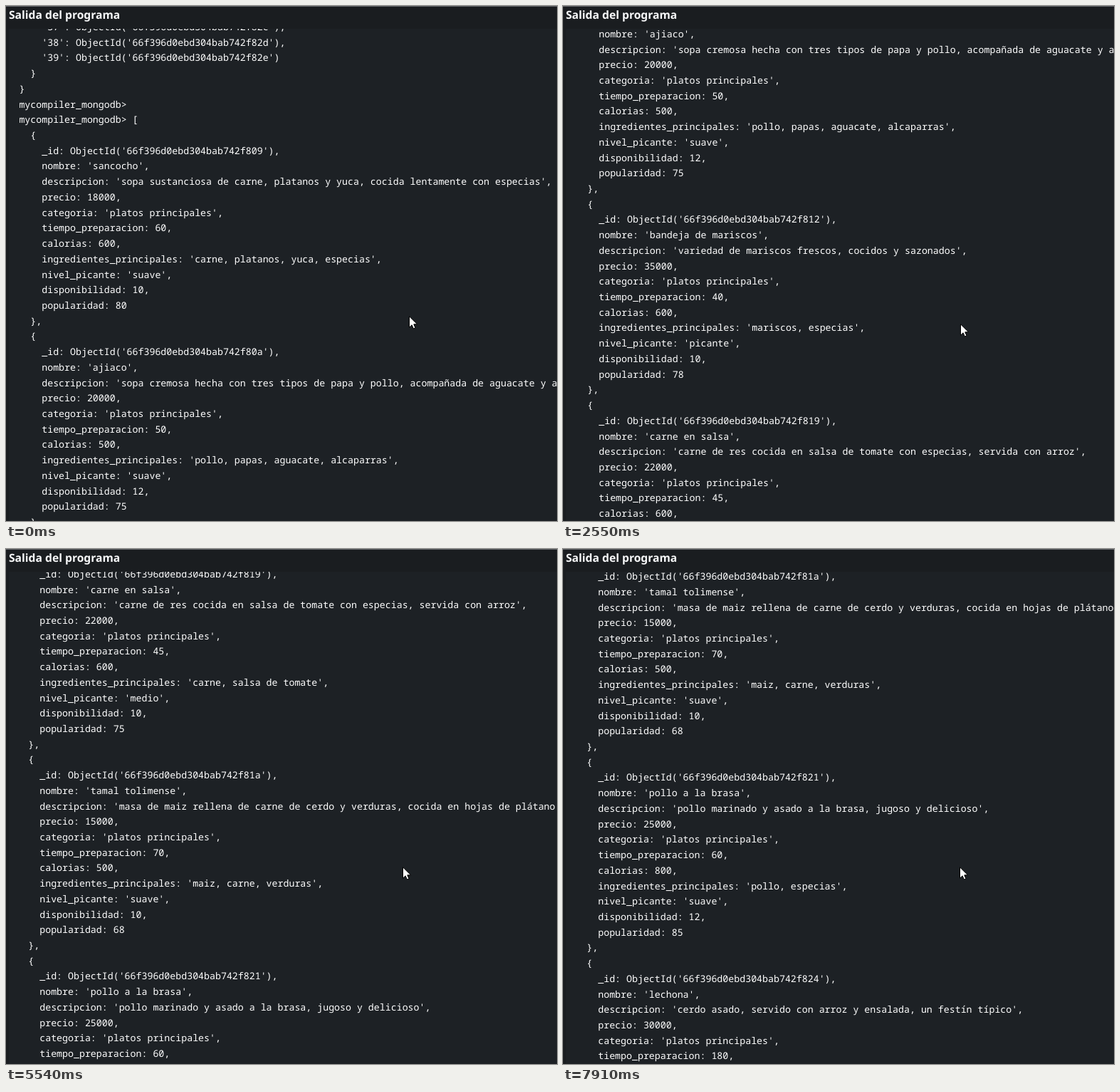
An HTML page for the animation above (8 s loop, 774 px wide and 723 px high).

```html
<!DOCTYPE html>
<html lang="es">
<head>
<meta charset="utf-8">
<title>Salida del programa</title>
<style>
html, body {
  margin: 0;
  width: 100%;
  height: 100%;
  overflow: hidden;
  background: #1a1d20;
}
.stage {
  position: relative;
  width: 774px;
  height: 723px;
  overflow: hidden;
  color: #fff;
}
.rule {
  position: absolute;
  inset: 0 0 auto;
  height: 1px;
  background: #64676a;
}
h1 {
  position: absolute;
  left: 4px;
  top: 1px;
  margin: 0;
  font: bold 15.65px/22px "Noto Sans", "Open Sans", sans-serif;
  text-rendering: geometricPrecision;
  white-space: nowrap;
  color: #f8f9fa;
}
.panel {
  position: absolute;
  left: 4px;
  top: 32px;
  right: 0;
  bottom: 0;
  overflow: hidden;
  background: #1d2125;
}
pre {
  position: absolute;
  left: 14.4px;
  top: -13px;
  margin: 0;
  font: 500 13.27px/21.72px "Noto Sans Mono", "DejaVu Sans Mono", monospace;
  font-variant-ligatures: none;
  text-rendering: geometricPrecision;
  animation: scroll 8s step-end infinite;
}
.cursor {
  position: absolute;
  left: 0;
  top: 0;
  width: 13px;
  height: 20px;
  overflow: visible;
  animation: point 8s step-end infinite;
}
@keyframes scroll {
  0% { transform: translate(0, 0); }
  1.875% { transform: translate(0, -20px); }
  3.5% { transform: translate(0, -58px); }
  5.125% { transform: translate(0, -88px); }
  6.75% { transform: translate(0, -108px); }
  8.375% { transform: translate(0, -117px); }
  15.375% { transform: translate(0, -133px); }
  17.25% { transform: translate(0, -234px); }
  23.75% { transform: translate(0, -236px); }
  25.375% { transform: translate(0, -328px); }
  26.875% { transform: translate(0, -351px); }
  30% { transform: translate(0, -400px); }
  31.875% { transform: translate(0, -468px); }
  35% { transform: translate(0, -490px); }
  36.625% { transform: translate(0, -585px); }
  39.75% { transform: translate(0, -592px); }
  41.625% { transform: translate(0, -702px); }
  45% { transform: translate(0, -730px); }
  46.5% { transform: translate(0, -819px); }
  62.125% { transform: translate(-1px, -832px); }
  63.75% { transform: translate(-1px, -870px); }
  65.375% { transform: translate(-1px, -920px); }
  67.375% { transform: translate(-3px, -972px); }
  69.25% { transform: translate(-3px, -1015px); }
  70.75% { transform: translate(-3px, -1042px); }
  72.375% { transform: translate(-3px, -1066px); }
  74% { transform: translate(-3px, -1086px); }
  75.625% { transform: translate(-3px, -1104px); }
  77.25% { transform: translate(0, -1118px); }
  79.125% { transform: translate(0, -1130px); }
  81% { transform: translate(0, -1140px); }
  83% { transform: translate(0, -1147px); }
  84.875% { transform: translate(-1px, -1153px); }
  93.75% { transform: translate(-1px, -1170px); }
  95.375% { transform: translate(-1px, -1215px); }
  97.25% { transform: translate(-1px, -1262px); }
  98.875%, 100% { transform: translate(-1px, -1294px); }
}
@keyframes point {
  0% { transform: translate(566px, 435px); }
  1.875% { transform: translate(563px, 439px); }
  3.5% { transform: translate(560px, 444px); }
  5.125% { transform: translate(558px, 446px); }
  50%, 100% { transform: translate(557px, 446px); }
}
</style>
</head>
<body>
<div class="stage">
  <div class="rule"></div>
  <h1>Salida del programa</h1>
  <div class="panel"><pre>    '37': ObjectId('66f396d0ebd304bab742f82c'),
    '38': ObjectId('66f396d0ebd304bab742f82d'),
    '39': ObjectId('66f396d0ebd304bab742f82e')
  }
}
mycompiler_mongodb&gt;
mycompiler_mongodb&gt; [
  {
    _id: ObjectId('66f396d0ebd304bab742f809'),
    nombre: 'sancocho',
    descripcion: 'sopa sustanciosa de carne, platanos y yuca, cocida lentamente con especias',
    precio: 18000,
    categoria: 'platos principales',
    tiempo_preparacion: 60,
    calorias: 600,
    ingredientes_principales: 'carne, platanos, yuca, especias',
    nivel_picante: 'suave',
    disponibilidad: 10,
    popularidad: 80
  },
  {
    _id: ObjectId('66f396d0ebd304bab742f80a'),
    nombre: 'ajiaco',
    descripcion: 'sopa cremosa hecha con tres tipos de papa y pollo, acompañada de aguacate y alcaparras',
    precio: 20000,
    categoria: 'platos principales',
    tiempo_preparacion: 50,
    calorias: 500,
    ingredientes_principales: 'pollo, papas, aguacate, alcaparras',
    nivel_picante: 'suave',
    disponibilidad: 12,
    popularidad: 75
  },
  {
    _id: ObjectId('66f396d0ebd304bab742f812'),
    nombre: 'bandeja de mariscos',
    descripcion: 'variedad de mariscos frescos, cocidos y sazonados',
    precio: 35000,
    categoria: 'platos principales',
    tiempo_preparacion: 40,
    calorias: 600,
    ingredientes_principales: 'mariscos, especias',
    nivel_picante: 'picante',
    disponibilidad: 10,
    popularidad: 78
  },
  {
    _id: ObjectId('66f396d0ebd304bab742f819'),
    nombre: 'carne en salsa',
    descripcion: 'carne de res cocida en salsa de tomate con especias, servida con arroz',
    precio: 22000,
    categoria: 'platos principales',
    tiempo_preparacion: 45,
    calorias: 600,
    ingredientes_principales: 'carne, salsa de tomate',
    nivel_picante: 'medio',
    disponibilidad: 10,
    popularidad: 75
  },
  {
    _id: ObjectId('66f396d0ebd304bab742f81a'),
    nombre: 'tamal tolimense',
    descripcion: 'masa de maiz rellena de carne de cerdo y verduras, cocida en hojas de plátano',
    precio: 15000,
    categoria: 'platos principales',
    tiempo_preparacion: 70,
    calorias: 500,
    ingredientes_principales: 'maiz, carne, verduras',
    nivel_picante: 'suave',
    disponibilidad: 10,
    popularidad: 68
  },
  {
    _id: ObjectId('66f396d0ebd304bab742f821'),
    nombre: 'pollo a la brasa',
    descripcion: 'pollo marinado y asado a la brasa, jugoso y delicioso',
    precio: 25000,
    categoria: 'platos principales',
    tiempo_preparacion: 60,
    calorias: 800,
    ingredientes_principales: 'pollo, especias',
    nivel_picante: 'suave',
    disponibilidad: 12,
    popularidad: 85
  },
  {
    _id: ObjectId('66f396d0ebd304bab742f824'),
    nombre: 'lechona',
    descripcion: 'cerdo asado, servido con arroz y ensalada, un festín típico',
    precio: 30000,
    categoria: 'platos principales',
    tiempo_preparacion: 180,
</pre></div>
  <svg class="cursor" viewBox="0 0 13 20">
    <path d="M.5 .8V16.2L4.1 12.8 6.4 18 9 16.9 6.8 11.8H11.6Z" fill="#fff" stroke="#000"/>
  </svg>
</div>
</body>
</html>
```
